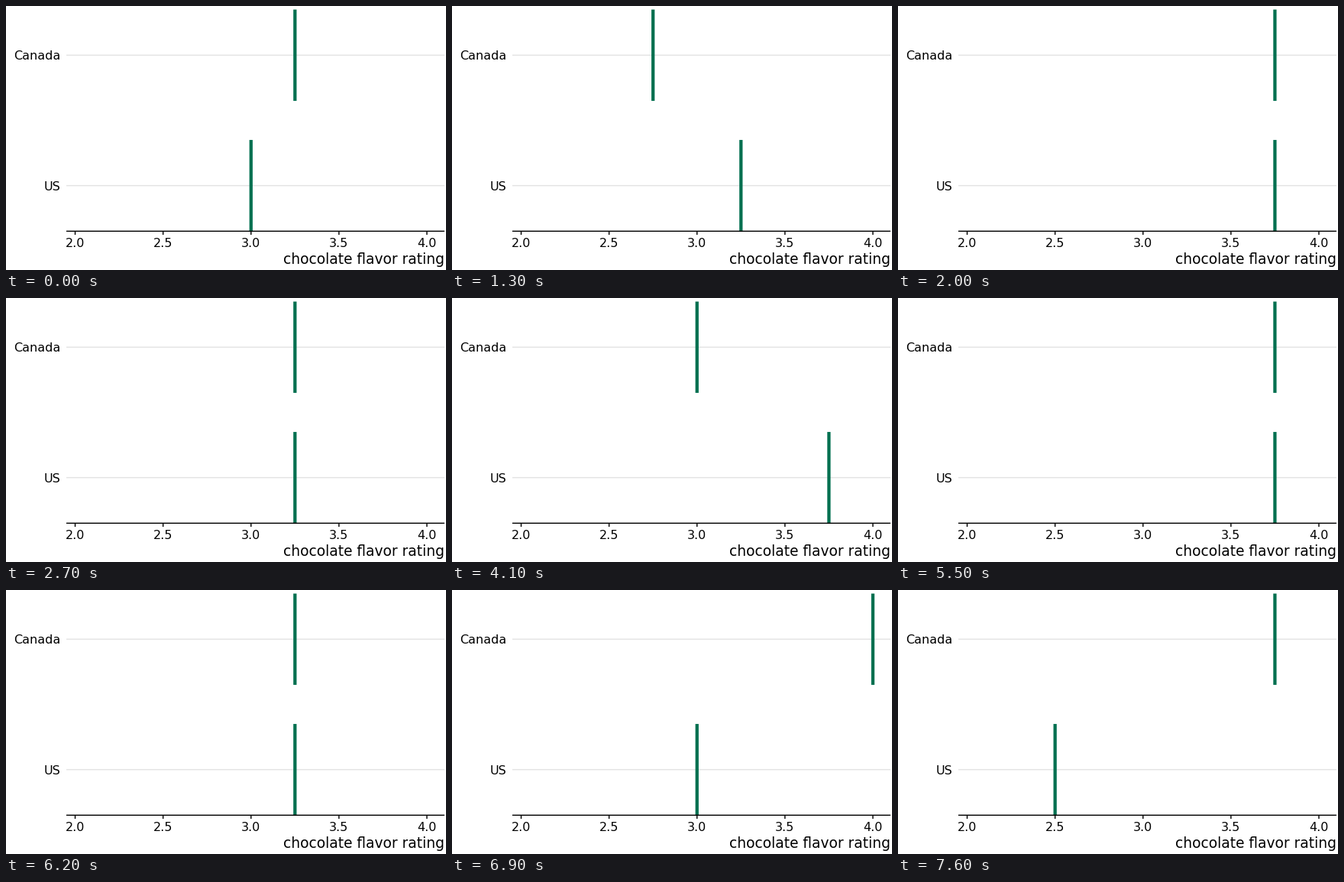
Recreate the animation shown at these times as a matplotlib script. Size 576 by 345 pixels, loop 8 s.

```python
import matplotlib.pyplot as plt
from matplotlib.animation import FuncAnimation

W, H, DPI = 576, 345, 96
STEP = 100       # ms per frame
LOOP = 8000      # ms
FIRST, HOLD = 600, 700

LEFT, RIGHT, BASE = 79, 574, 294.3
X_MIN, X_MAX = 1.95, 4.1
ROWS = {"Canada": 64.3, "US": 234.7}
HALF_BAR = 59.65
GREEN, GRID = "#007050", "#e4e4e4"
THIN, THICK = 1.07, 3.2

# One (Canada, US) rating pair per draw
DRAWS = [
    (3.25, 3.0), (3.0, 3.0), (2.75, 3.25), (3.75, 3.75),
    (3.25, 3.25), (2.75, 3.0), (3.0, 3.75), (3.25, 3.25),
    (3.75, 3.75), (3.25, 3.25), (4.0, 3.0), (3.75, 2.5),
]


def to_x(rating):
    return LEFT + (rating - X_MIN) / (X_MAX - X_MIN) * (RIGHT - LEFT)


plt.rcParams["font.family"] = "DejaVu Sans"
fig = plt.figure(figsize=(W / DPI, H / DPI), dpi=DPI, facecolor="white")
ax = fig.add_axes([0, 0, 1, 1])
ax.set(xlim=(0, W), ylim=(H, 0))
ax.axis("off")


def line(xs, ys, color, width, z):
    return ax.plot(xs, ys, color=color, lw=width, zorder=z,
                   solid_capstyle="butt", snap=False)[0]


def label(x, y, text, ha, size=12):
    ax.text(x, y, text, ha=ha, va="baseline", size=size, color="black")


bars = []
for name, y in ROWS.items():
    line([LEFT, RIGHT], [y, y], GRID, THIN, 1)
    label(71, y + 5.9, name, "right")
    bars.append(line([0, 0], [y - HALF_BAR, y + HALF_BAR], GREEN, THICK, 2))

line([LEFT, RIGHT], [BASE, BASE], "black", THIN, 3)
for tick in (2.0, 2.5, 3.0, 3.5, 4.0):
    x = to_x(tick)
    line([x, x], [BASE, BASE + 4.67], "black", THIN, 3)
    label(x, 315, f"{tick:.1f}", "center")
label(RIGHT, 337, "chocolate \ufb02avor rating", "right", 14)


def update(frame):
    t = frame * STEP
    draw = 0 if t < FIRST else 1 + (t - FIRST) // HOLD
    for bar, rating in zip(bars, DRAWS[draw]):
        x = to_x(rating)
        bar.set_xdata([x, x])
    return bars


anim = FuncAnimation(fig, update, frames=LOOP // STEP, interval=STEP,
                     repeat=True, repeat_delay=0, blit=False)
plt.show()
```
